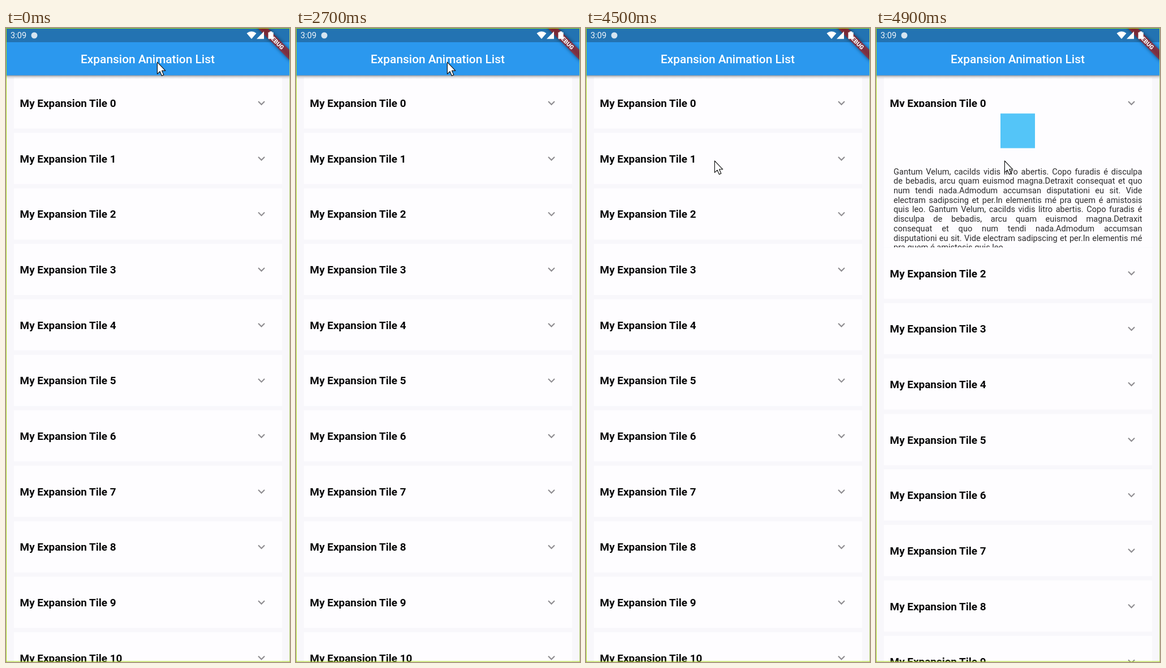
An HTML page that plays this animation: 502 px wide and 1116 px high, repeating every 5 s.

```html
<!DOCTYPE html>
<html lang="en">
<head>
<meta charset="utf-8">
<title>Expansion Animation List</title>
<style>
  html, body { margin: 0; width: 100%; height: 100%; overflow: hidden; background: #f8f7fb; }
  svg { display: block; width: 100%; height: 100%; font-family: Roboto, sans-serif; }
  .label { font-size: 18.9px; font-weight: 700; fill: #060607; }
  .title { font-size: 20.87px; font-weight: 500; fill: #fff; text-anchor: middle; }
  .clock { font-size: 14.6px; fill: #f2f6fa; }
  .banner { font-size: 10.4px; font-weight: 900; fill: #fff; text-anchor: middle; }
  .body { font: 14.6px/16.7px Roboto, sans-serif; color: #2c2b2d; }
  .body div { text-align: justify; text-align-last: justify; white-space: nowrap; }
  .body div:last-child { text-align-last: left; }
</style>
</head>
<body>
<svg viewBox="0 0 502 1116" xmlns="http://www.w3.org/2000/svg">
  <defs>
    <linearGradient id="shade" x2="0" y2="1">
      <stop offset="0" stop-color="#000" stop-opacity=".42"/>
      <stop offset=".4" stop-color="#000" stop-opacity=".14"/>
      <stop offset="1" stop-color="#000" stop-opacity="0"/>
    </linearGradient>
    <filter id="blur" x="-20%" y="-100%" width="140%" height="300%">
      <feGaussianBlur stdDeviation="3"/>
    </filter>
    <clipPath id="clip"><rect id="clipBox" x="14" y="0" width="474" height="0"/></clipPath>
  </defs>
  <rect width="502" height="1116" fill="#f8f7fb"/>

  <g id="upper"></g>
  <g id="panel" clip-path="url(#clip)">
    <g id="content">
      <rect x="14" width="474" height="290" fill="#fefdff"/>
      <rect x="220" y="11.5" width="61" height="61" fill="#54c5f8"/>
      <foreignObject x="31" y="105.6" width="439.5" height="170">
        <div class="body" id="body" xmlns="http://www.w3.org/1999/xhtml"></div>
      </foreignObject>
    </g>
  </g>
  <g id="lower"></g>

  <rect y="83" width="502" height="7" fill="url(#shade)"/>
  <rect width="502" height="83.3" fill="#2b98ee"/>
  <rect width="502" height="25" fill="#2373b2"/>
  <text class="title" x="250.5" y="62">Expansion Animation List</text>
  <text class="clock" x="8" y="18">3:09</text>
  <circle cx="50" cy="13" r="5.5" fill="#d5e4f0"/>

  <g transform="translate(502 0) rotate(45)">
    <rect x="-42" y="28" width="84" height="12.5" fill="#000" opacity=".5" filter="url(#blur)"/>
    <rect x="-42" y="28" width="84" height="12.5" fill="#b71c1c" opacity=".63"/>
    <text class="banner" y="37.9">DEBUG</text>
  </g>
  <g fill="#fff">
    <path d="M425.5 9.2Q434 2.6 442.5 9.2L434 19.2Z"/>
    <path d="M456 6V19.2H443Z"/>
    <path d="M463.5 7.4H466V6H470.3V7.4H472.7V19.2H463.5Z"/>
  </g>

  <path d="M501.5 0V1116" stroke="#b4cf7a"/>
  <path d="M.5 1116V.5H502M0 1115H502" fill="none" stroke="#aadc1e"/>
  <path id="cursor" d="M0 0V21.5L4.9 17L8.3 24.8L11.9 23.2L8.5 15.6H15Z"
        fill="#fff" stroke="#111" stroke-width="1.2" stroke-linejoin="round"/>
</svg>
<script>
const LOOP = 5000, STEP = 100, PITCH = 97.65;
const $ = id => document.getElementById(id);
const clamp = v => Math.min(1, Math.max(0, v));
const mix = (a, b, k) => a + (b - a) * k;
const ease = k => k * k * (3 - 2 * k);

const lines = [
  'Gantum Velum, cacilds vidis litro abertis. Copo furadis é disculpa',
  'de bebadis, arcu quam euismod magna.Detraxit consequat et quo',
  'num tendi nada.Admodum accumsan disputationi eu sit. Vide',
  'electram sadipscing et per.In elementis mé pra quem é amistosis',
  'quis leo. Gantum Velum, cacilds vidis litro abertis. Copo furadis é',
  'disculpa de bebadis, arcu quam euismod magna.Detraxit',
  'consequat et quo num tendi nada.Admodum accumsan',
  'disputationi eu sit. Vide electram sadipscing et per.In elementis mé',
  'pra quem é amistosis quis leo.'
];
$('body').innerHTML = lines.map(s => `<div>${s}</div>`).join('');

const tile = n => `<g transform="translate(0 ${(87 + PITCH * n).toFixed(1)})">
  <rect x="14" width="474" height="90" fill="#fefdff"/>
  <text class="label" x="24.6" y="52.2">My Expansion Tile ${n}</text>
  <path transform="translate(439 32.6) scale(1.043)" fill="#8e8c90"
    d="M16.59 8.59L12 13.17 7.41 8.59 6 10l6 6 6-6z"/></g>`;
const tiles = (from, to) => {
  let out = '';
  for (let n = from; n <= to; n++) out += tile(n);
  return out;
};
$('upper').innerHTML = tiles(0, 1);
$('lower').innerHTML = tiles(2, 10);

function draw(t) {
  const move = ease(clamp((t - 3000) / 500));
  $('cursor').setAttribute('transform',
    `translate(${mix(267.4, 227.4, move)} ${mix(60.2, 233.8, move)}) scale(.96)`);

  // The opened panel slides down while the tiles below make room.
  const open = t > 4515;
  const shift = open ? (t - 4515) * 0.2705 : 0;
  $('panel').style.display = open ? '' : 'none';
  $('content').setAttribute('transform', `translate(0 ${139 - (4900 - t) * 0.332})`);
  $('clipBox').setAttribute('height', 87 + PITCH * 2 + shift);
  $('lower').setAttribute('transform', `translate(0 ${shift})`);
}

function tick() {
  const t = performance.now() % LOOP;
  draw(Math.floor(t / STEP) * STEP);
  requestAnimationFrame(tick);
}
tick();
</script>
</body>
</html>
```
